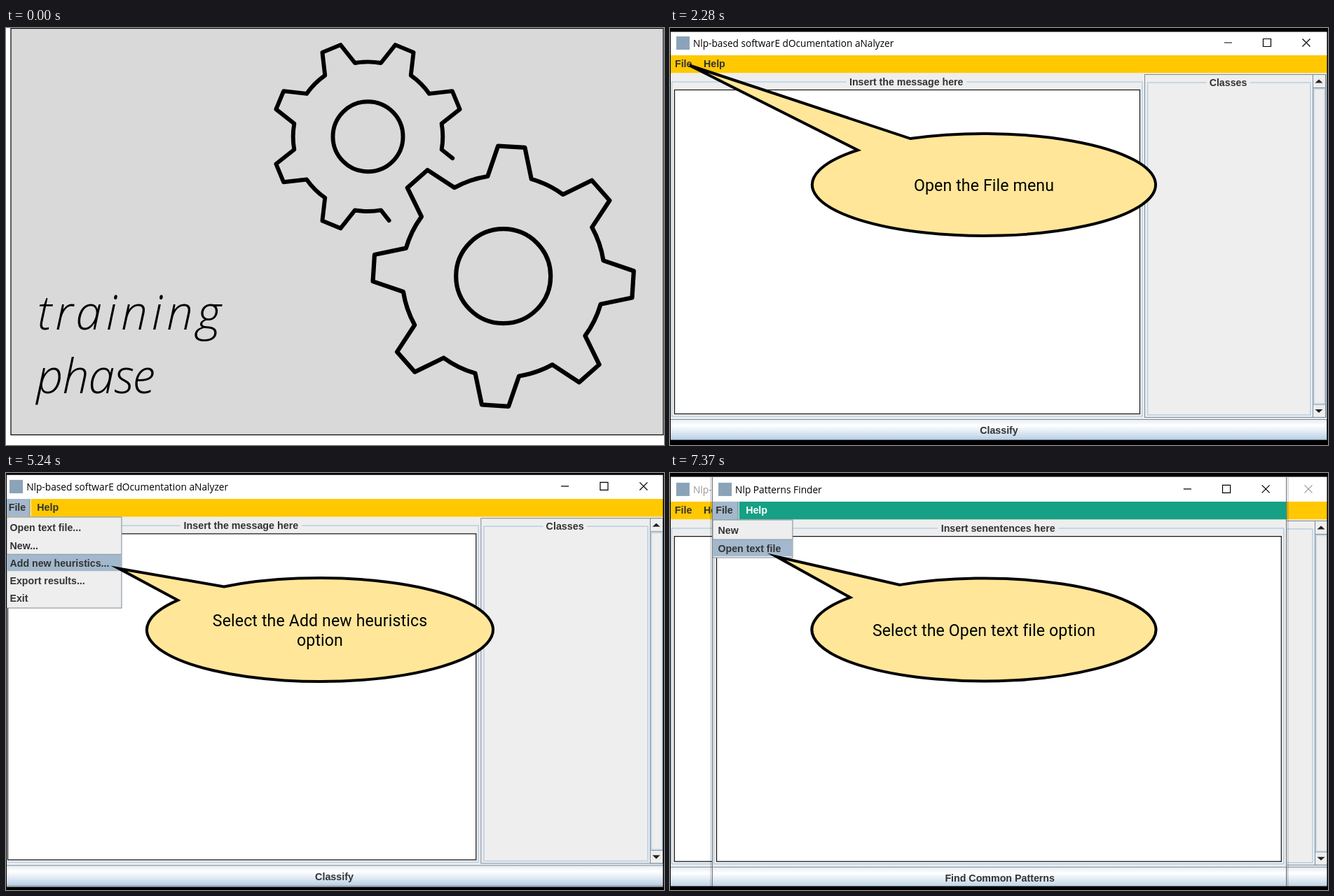
Write an HTML page that moves like this. It is 939 px wide and 596 px high and loops after 8 s.

```html
<!DOCTYPE html>
<html lang="en">
<head>
<meta charset="utf-8">
<title>Training phase walkthrough</title>
<style>
html, body { margin: 0; width: 100%; height: 100%; overflow: hidden; background: #fff; }
svg { display: block; }
.hand { font: italic 350 68px "Open Sans", "Noto Sans", sans-serif; letter-spacing: -.8px; }
.wide { letter-spacing: 5.6px; }
.title { font: 13.65px "Open Sans", "Noto Sans", sans-serif; }
.bold { font: bold 14.2px "Liberation Sans", Arial, sans-serif; fill: #333; }
.call { font: 23.1px Roboto, sans-serif; letter-spacing: .13px; }
.mid { text-anchor: middle; }
.gear { fill: none; stroke: #000; stroke-linecap: round; stroke-linejoin: round; }
</style>
</head>
<body>
<svg id="stage" width="939" height="596"></svg>
<script>
const LOOP = 8000;
const STEEL = '#7a8a99', PALE = '#b8cfe5', SELECTED = '#a3b8cc', PANEL = '#eee';

const rect = (x, y, w, h, fill, stroke = 'none', lw = 1) =>
  `<rect x="${x}" y="${y}" width="${w}" height="${h}" fill="${fill}" stroke="${stroke}" stroke-width="${lw}"/>`;
const line = (d, stroke, lw = 1) => `<path d="${d}" fill="none" stroke="${stroke}" stroke-width="${lw}"/>`;
const text = (x, y, cls, s, fill = '') =>
  `<text x="${x}" y="${y}" class="${cls}"${fill && ` style="fill:${fill}"`}>${s}</text>`;
const place = (x, y, scale, body) => `<g transform="translate(${x} ${y}) scale(${scale})">${body}</g>`;

// Angles in degrees, clockwise from the top.
const polar = (cx, cy, r, deg) => {
  const a = deg * Math.PI / 180;
  return [cx + r * Math.sin(a), cy - r * Math.cos(a)];
};
const mix = (a, b, k) => a.map((v, i) => v + (b[i] - v) * k);

function gear({ cx, cy, hole, root, tip, first, teeth, open, lw }) {
  const base = deg => polar(cx, cy, root, deg), top = deg => polar(cx, cy, tip, deg);
  const arc = deg => `A${root} ${root} 0 0 1 ${base(deg)}`;
  const last = first + 45 * teeth;
  let d = open
    ? `M${mix(base(first - 32.5), top(first - 39), .57)}L${base(first - 32.5)}`
    : `M${base(first - 32.5)}`;
  for (let c = first; c < last; c += 45)
    d += `${arc(c - 12.5)}L${top(c - 5.9)}L${top(c + 5.9)}L${base(c + 12.5)}`;
  d += open ? `${arc(last - 12.5)}L${mix(base(last - 12.5), top(last - 5.9), .6)}` : 'Z';
  return `<g class="gear" stroke-width="${lw}"><path d="${d}"/><circle cx="${cx}" cy="${cy}" r="${hole}"/></g>`;
}

// Etched border whose top edge leaves room for a heading.
const titled = (x, y, right, bottom, mid, gap, label) =>
  line(`M${mid - gap} ${y}H${x}V${bottom}H${right}V${y}H${mid + gap}`, PALE, 1.5) +
  text(mid, y + 5, 'bold mid', label);

function windowFrame({ w, areaRight, title, heading, button, bar, help = '#333', ink = '#000' }) {
  const close = w - 30;
  return rect(0, 2, w, 37, '#fff') +
    rect(9, 12, 19, 19, '#8ba3b8') +
    text(33, 27, 'title', title, ink) +
    line(`M${close - 117} 21h11M${close - 61.5} 15.5h11v11h-11zM${close - 5.5} 15.5l11 11m0 -11l-11 11`, ink, 1.2) +
    rect(0, 39, w, 25.5, bar) +
    text(7, 56, 'bold', 'File') + text(48, 56, 'bold', 'Help', help) +
    rect(0, 64.5, w, 528, PANEL) +
    titled(2.5, 77, areaRight + 3.5, 555, areaRight / 2 + 2, 86, heading) +
    rect(6.5, 88.5, areaRight - 6.5, 463, '#fff', '#111', 1.2) +
    rect(.5, 559.5, w - 1, 29, 'url(#metal)', STEEL) +
    text(w / 2 + .5, 580, 'bold mid', button);
}

function mainWindow(ink) {
  return windowFrame({
    w: 938, areaRight: 670.5, title: 'Nlp-based softwarE dOcumentation aNalyzer',
    heading: 'Insert the message here', button: 'Classify', bar: '#ffc800', ink
  }) +
    rect(677.5, 66.5, 258.5, 490, 'none', STEEL) +
    titled(681.5, 78, 914, 553, 796.5, 31, 'Classes') +
    rect(917.5, 66.5, 18, 490, PANEL, STEEL) +
    line('M918 85.5h17M918 538h17', STEEL) +
    rect(919, 87, 15.5, 450, PANEL, PALE, 1.5) +
    '<path d="M920.5 78.5l5.5-5 5.5 5zM920.5 545l5.5 5 5.5-5z" fill="#222"/>';
}

const patternWindow = () => windowFrame({
  w: 817.5, areaRight: 809.5, title: 'Nlp Patterns Finder', heading: 'Insert senentences here',
  button: 'Find Common Patterns', bar: '#16a085', help: '#fff'
});

const openMenu = (x, y, w) =>
  rect(x, y, w, 25, SELECTED) + line(`M${x + w} ${y}v25`, STEEL) +
  line(`M${x + w + 1.2} ${y}v25`, '#fff') + text(x + w / 2 - 1.5, y + 17, 'bold mid', 'File');

const popup = (x, y, w, h, inset, items, chosen) =>
  rect(x, y, w, h, PANEL, STEEL) +
  items.map((item, i) => {
    const base = y + 20.3 + i * 25.2;
    const mark = rect(x + .5, base - 17.5, w - 1, 24, SELECTED) + line(`M${x} ${base - 17.5}h${w}`, STEEL, .8);
    return (i === chosen ? mark : '') + text(x + inset, base, 'bold', item);
  }).join('');

function callout(rx, ry, left, right, tip, lines) {
  const cx = 448, cy = 224;
  const edge = x => `${x} ${cy - ry * Math.sqrt(1 - ((x - cx) / rx) ** 2)}`;
  return `<path d="M${edge(right)}A${rx} ${ry} 0 1 1 ${edge(left)}L${tip}Z" fill="#ffe699"
    stroke="#000" stroke-width="4" stroke-miterlimit="8"/>` +
    lines.map((s, i) => text(cx, 233 + (i - (lines.length - 1) / 2) * 28, 'call mid', s)).join('');
}

const blackEdges = (top, bottom) =>
  `<path d="M0 0H939V596H0ZM1 ${top}V${bottom}H937.5V${top}Z" fill-rule="evenodd"/>`;

const scenes = [
  { start: 0, body:
    rect(0, 0, 939, 596, '#fff') + rect(7, .5, 931, 581, '#d9d9d9', '#000', 1.2) +
    gear({ cx: 516.5, cy: 155.2, hole: 50, root: 106.8, tip: 136.8, first: 202.5, teeth: 6, open: true, lw: 5.9 }) +
    gear({ cx: 709.7, cy: 354.7, hole: 67.5, root: 144.5, tip: 186.3, first: 3.6, teeth: 8, lw: 6.2 }) +
    text(44, 431, 'hand wide', 'training') + text(43, 522, 'hand', 'phase') },
  { start: 500, body:
    mainWindow() + blackEdges(5.5, 589) +
    callout(245, 73, 268, 343, '28 53.5', ['Open the File menu']) },
  { start: 3460, body:
    place(-4.05, -2.2, 1.0065, mainWindow()) + openMenu(1, 37, 33) +
    popup(1, 63, 164, 130, 4.5,
      ['Open text file...', 'New...', 'Add new heuristics...', 'Export results...', 'Exit'], 2) +
    blackEdges(2.8, 591.5) +
    callout(247, 74, 245, 311, '161 136.5', ['Select the Add new heuristics', 'option']) },
  { start: 6420, body:
    place(-.2, 1.8, 1.0035, mainWindow('#999')) +
    rect(57, 6, 826, 586, 'rgba(0,0,0,.12)') +
    place(60, 1.8, 1.0035, patternWindow()) +
    line('M60.5 6V590M879.5 6V590', '#777') + openMenu(61, 41, 36) +
    popup(61, 67, 114, 54, 7.5, ['New', 'Open text file'], 1) +
    blackEdges(5.5, 590.5) +
    callout(245.5, 73.5, 257, 328, '152 119.5', ['Select the Open text file option']) }
];

const stage = document.getElementById('stage');
stage.innerHTML = `<defs><linearGradient id="metal" x2="0" y2="1">
  <stop stop-color="#e4edf6"/><stop offset=".3" stop-color="#fff"/><stop offset="1" stop-color="${PALE}"/>
  </linearGradient></defs>` + scenes.map(s => `<g class="scene">${s.body}</g>`).join('');
const groups = [...stage.querySelectorAll('.scene')];

function draw(now) {
  const t = now % LOOP;
  const current = scenes.findLastIndex(s => t >= s.start);
  groups.forEach((g, i) => g.style.display = i === current ? '' : 'none');
  requestAnimationFrame(draw);
}
draw(0);
</script>
</body>
</html>
```
